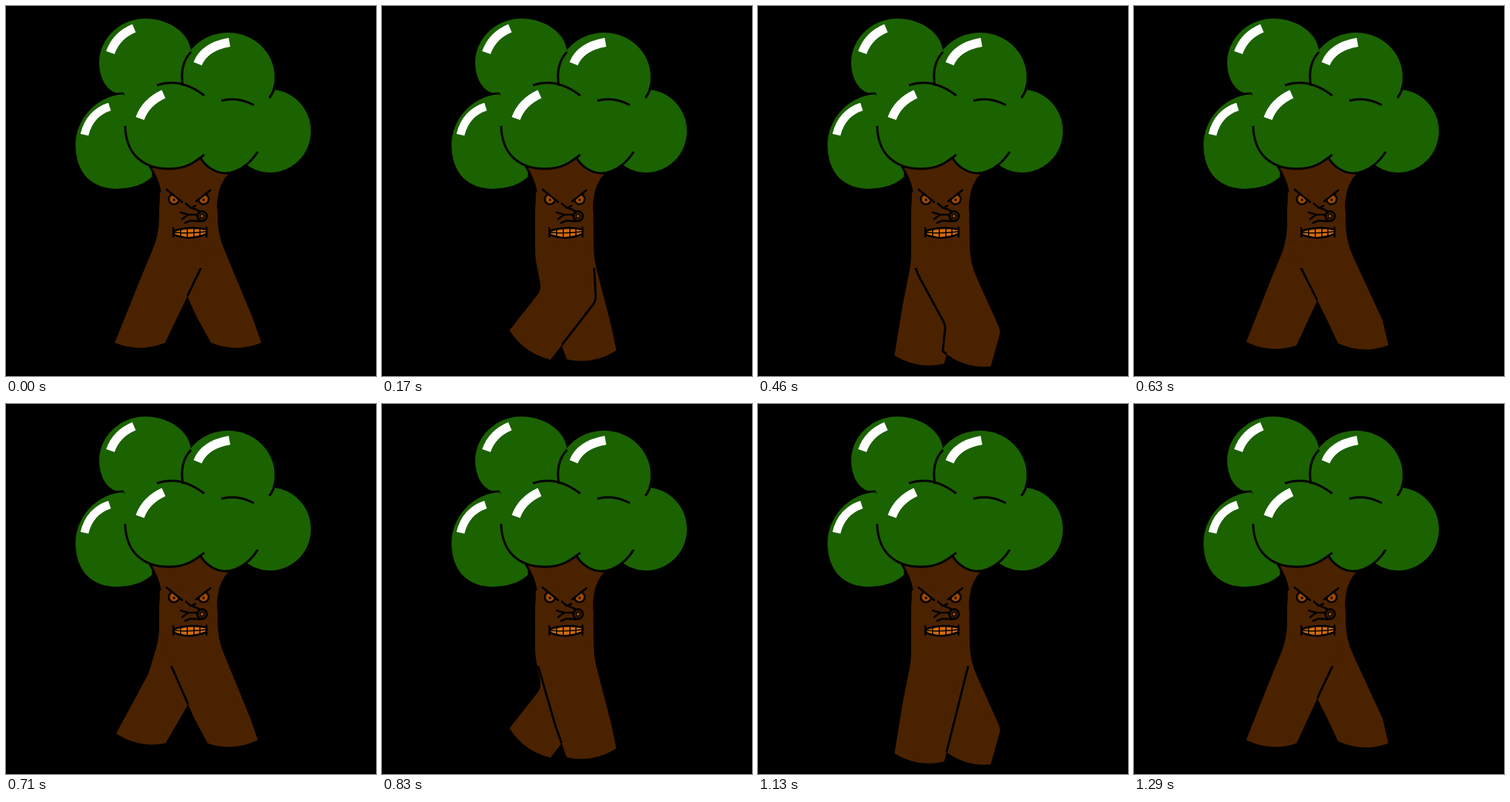
An HTML page with a canvas for the animation above (1.33 s loop, 500 by 500 pixels).

```html
<!DOCTYPE html>
<html>
<head>
<meta charset="utf-8">
<style>
html, body { margin: 0; width: 100%; height: 100%; overflow: hidden; background: #000; }
canvas { display: block; width: 500px; height: 500px; }
</style>
</head>
<body>
<canvas id="stage" width="500" height="500"></canvas>
<script>
const ctx = document.getElementById('stage').getContext('2d');
const LOOP = 1330, STEPS = 32, STEP_MS = 1000 / 24;
const GREEN = '#1b6200', BROWN = '#4b2200', EYE = '#9c4a00', TEETH = '#d46c08';
const HIP_LEFT = 207, HIP_RIGHT = 286, HIP_MID = (HIP_LEFT + HIP_RIGHT) / 2;
const SEAM_TOP = 354;

// Pose of one leg: phase 0 is fully back, PI fully forward; the first half is the swing
function legPose(phase) {
  const cos = Math.cos(phase), sin = Math.sin(phase);
  const swing = Math.max(0, sin), stance = Math.max(0, -sin);
  const hipY = 308 + 46 * Math.abs(sin);
  const ankle = {
    x: 246 - 65 * cos * (1 - 0.27 * stance),
    y: 455 + 33 * sin * sin - swing * (9 + 14 * cos)
  };
  const along = 0.57 - 0.2 * cos;
  const knee = {
    x: HIP_MID + (ankle.x - HIP_MID) * along + swing * (30 + 10 * cos),
    y: hipY + (ankle.y - hipY) * along
  };
  const tilt = (swing * (34 + 43 * cos) - 10 * Math.sin(2 * phase)) * Math.PI / 180;
  return { hipY, knee, ankle, tilt };
}

// Point at a signed distance from a joint, along a tilted line
const beside = (joint, tilt, distance) => [
  joint.x + Math.cos(tilt) * distance,
  joint.y + Math.sin(tilt) * distance
];

function legPath({ hipY, knee, ankle, tilt }) {
  const path = new Path2D();
  const half = 34;
  const kneeL = beside(knee, tilt / 3, -38), kneeR = beside(knee, tilt / 3, 37);
  const heel = beside(ankle, tilt, -half), toe = beside(ankle, tilt, half);
  const sole = beside(ankle, tilt + Math.PI / 2, 14);
  path.moveTo(HIP_LEFT, 270);
  path.arcTo(HIP_LEFT, hipY, ...kneeL, 110);
  path.arcTo(...kneeL, ...heel, 18);
  path.lineTo(...heel);
  path.quadraticCurveTo(...sole, ...toe);
  path.arcTo(...kneeR, HIP_RIGHT, hipY, 18);
  path.arcTo(HIP_RIGHT, hipY, HIP_RIGHT, 270, 110);
  path.lineTo(HIP_RIGHT - 1, 270);
  path.closePath();
  return path;
}

function fill(shape, color) {
  ctx.fillStyle = color;
  ctx.fill(typeof shape === 'string' ? new Path2D(shape) : shape);
}

function line(shape, width = 3, color = '#000') {
  ctx.lineWidth = width;
  ctx.strokeStyle = color;
  ctx.stroke(typeof shape === 'string' ? new Path2D(shape) : shape);
}

function blob(x, y, rx, ry, color = GREEN) {
  const path = new Path2D();
  path.ellipse(x, y, rx, ry, 0, 0, Math.PI * 2);
  fill(path, color);
  return path;
}

function drawLegs(phase) {
  const front = legPath(legPose(phase));
  const back = legPath(legPose(phase + Math.PI));
  fill(back, BROWN);
  fill(front, BROWN);
  // The outline only shows where the front leg crosses the back one
  ctx.save();
  ctx.beginPath();
  ctx.rect(0, SEAM_TOP, 500, 500 - SEAM_TOP);
  ctx.clip();
  ctx.clip(back);
  line(front);
  ctx.restore();
}

function drawTrunk() {
  fill('M194 212 Q207 238 208 252 L207 285 L286 285 Q284 270 286 260 Q288 240 301 226 L285 195 L210 195 Z', BROWN);
  line('M193 214 Q207 238 208 252');
}

function drawLeaves() {
  const middle = 'M161 162 C162 203 188 220 220 220 C243 220 254 212 268 201';
  const lower = 'M262 204 C270 218 284 226 297 226 C315 225 331 212 340 197';

  fill('M158 119 C138 119 126 100 126 76 C126 44 154 17 188 17 C222 17 249 38 250 63 L240 110 Z', GREEN);
  blob(300, 96, 63, 60);
  blob(357, 169, 55, 56);
  fill('M160 115 L200 85 L330 110 L356 124 L340 195 L265 200 L161 165 Z', GREEN);
  fill(middle + ' L262 130 Z', GREEN);
  fill(lower + ' L300 150 Z', GREEN);

  line(middle);
  line(lower);
  line('M250 62 Q234 79 239 108');
  line('M143 120 Q150 118 159 118', 2.5);
  line('M204 107 Q236 96 268 121');
  line('M291 128 Q313 122 335 134');
  line('M356 124 Q362 116 363 108');

  line('M141 63 Q149 40 173 30', 12, '#fff');
  line('M259 78 Q268 55 302 49', 12, '#fff');
  line('M106 174 Q113 145 140 136', 11, '#fff');
  line('M181 152 Q189 130 213 119', 12, '#fff');
}

function drawEye(x) {
  line(blob(x, 261, 7, 7, EYE), 2.6);
  blob(x, 262, 1.6, 1.6, '#000');
}

function drawFace() {
  drawEye(227);
  drawEye(267);
  fill('M217 248 L238 266 L240 250 Z M276 249 L256 265 L254 250 Z', BROWN);
  ctx.lineCap = 'round';
  line('M217 248 L238 265 M276 249 L257 264', 2.8);
  line('M243 267 L250 273 L256 270', 2.6);
  line('M250 272 L263 278 M236 279 L246 282 L257 282 M246 282 L238 288 M242 293 L250 290 L262 291', 2.6);
  line(blob(265, 284, 6.5, 6.5, BROWN), 2.8);
  line(blob(265, 284, 2.8, 2.8, EYE), 1.6);

  const mouth = 'M227 304 Q249 297 271 302 L271 308 Q248 318 227 309 Z';
  fill(mouth, TEETH);
  line(mouth, 2.6);
  line('M226 300 V312 M271 299 V312', 2.4);
  line('M228 306 Q248 308 270 305 M236 302 V311 M245 301 V313 M254 301 V313 M262 301 V311', 1.6);
  ctx.lineCap = 'butt';
}

function draw(phase) {
  ctx.fillStyle = '#000';
  ctx.fillRect(0, 0, 500, 500);
  ctx.lineJoin = 'round';
  fill('M158 119 C120 122 94 155 94 187 C94 228 118 247 150 247 C170 246 185 242 197 231 L200 160 Z', GREEN);
  drawLegs(phase);
  drawTrunk();
  drawLeaves();
  drawFace();
}

// The walk holds each pose for one step, on a clock of 10 ms
function tick() {
  const clock = Math.floor(performance.now() % LOOP / 10) * 10;
  const step = Math.min(STEPS - 1, Math.floor((clock + 5) / STEP_MS));
  draw(step / STEPS * Math.PI * 2);
  requestAnimationFrame(tick);
}
tick();
</script>
</body>
</html>
```
